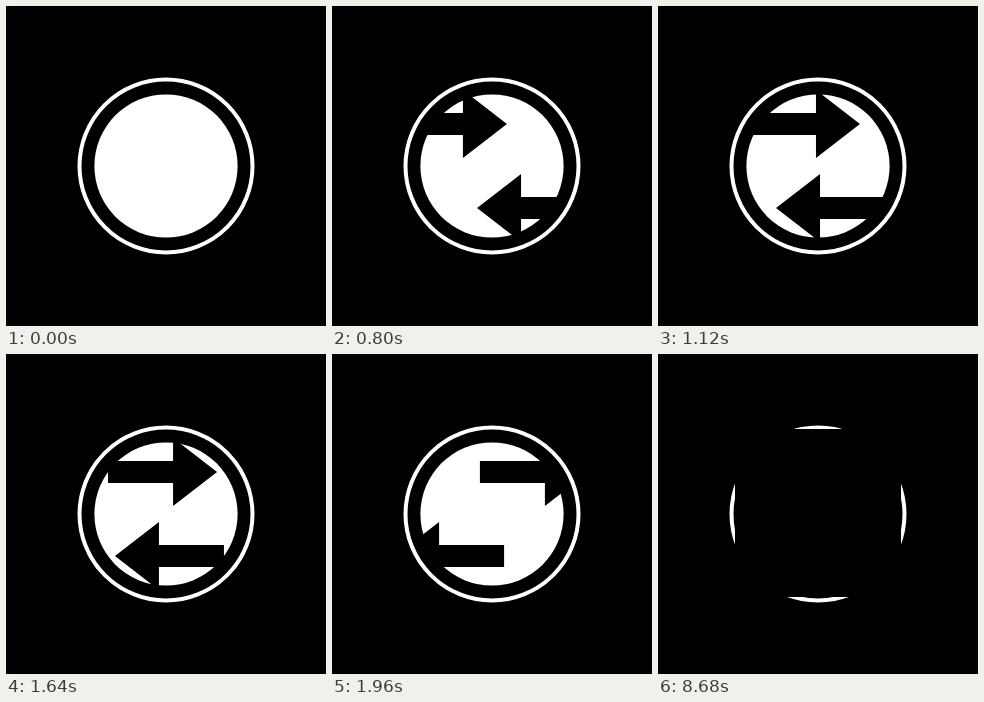
An HTML page that plays this animation: 320 px wide and 320 px high, repeating every 8.8 s.

```html
<!DOCTYPE html>
<html lang="en">
<head>
<meta charset="utf-8">
<title>Two arrows crossing a disc</title>
<style>
  html, body { margin: 0; height: 100%; overflow: hidden; background: #000; }
  svg { display: block; width: 100%; height: 100%; }
</style>
</head>
<body>
<svg viewBox="0 0 320 320">
  <defs>
    <path id="arrow" d="M0 118l-44-34v23h-65v22h65v23z"/>
  </defs>
  <circle cx="160" cy="160" r="71.6" fill="#fff"/>
  <use id="right" href="#arrow"/>
  <use id="left" href="#arrow"/>
  <circle cx="160" cy="160" r="86.5" fill="none" stroke="#fff" stroke-width="4"/>
  <rect id="cover" x="77" y="75" width="166" height="168"/>
</svg>
<script>
  const LOOP = 8800, STEP = 40;
  const ARRIVE = 1200, LEAVE = 1440, BLACKOUT = 8680;
  const REST = 203.1; // tip of the right-hand arrow while it pauses
  const [right, left, cover] = ['right', 'left', 'cover'].map(id => document.getElementById(id));

  // Decelerate into the pause, then accelerate away.
  function tipAt(t) {
    if (t < ARRIVE) return REST - 1.76e-4 * (ARRIVE - t) ** 2;
    if (t > LEAVE) return REST + 1.99e-4 * (t - LEAVE) ** 2;
    return REST;
  }

  function draw() {
    const t = Math.floor(performance.now() % LOOP / STEP) * STEP;
    const shift = `translate(${tipAt(t)} 0)`;
    right.setAttribute('transform', shift);
    left.setAttribute('transform', `rotate(180 160 160) ${shift}`);
    cover.style.display = t < BLACKOUT ? 'none' : '';
    requestAnimationFrame(draw);
  }
  draw();
</script>
</body>
</html>
```
